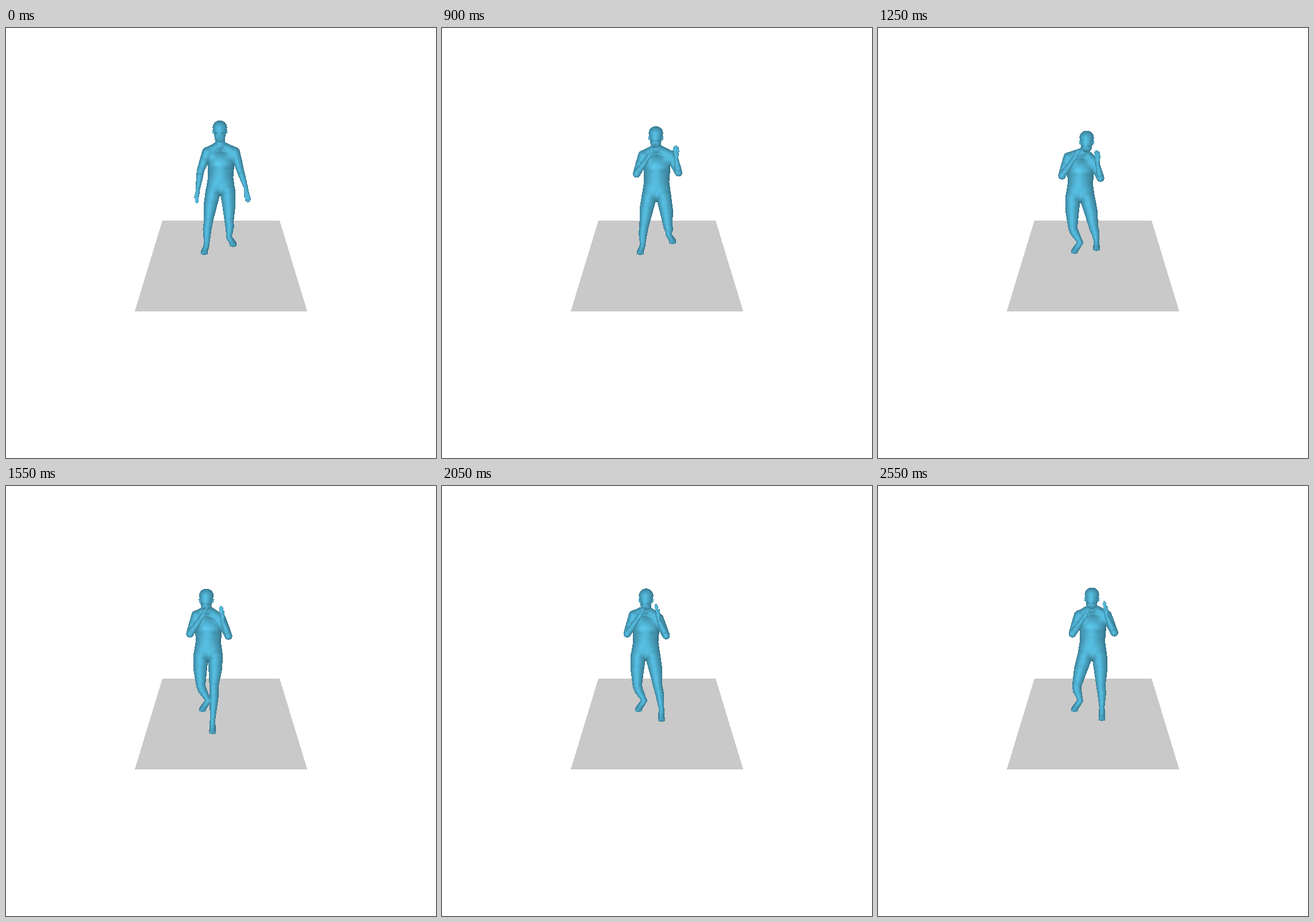
An HTML page with a canvas for the animation above (2600 ms loop, 748 by 748 pixels).

```html
<!DOCTYPE html>
<html lang="en">
<head>
<meta charset="utf-8">
<title>Guard stance</title>
<style>
  html, body { margin: 0; width: 100%; height: 100%; overflow: hidden; background: #fff; }
  svg, canvas { position: absolute; display: block; }
  svg { left: 0; top: 0; }
  canvas { left: 290px; top: 150px; }
</style>
</head>
<body>
<svg width="748" height="748" viewBox="0 0 748 748">
  <path d="M272 335H476L524 493H224Z" fill="#c9c9c9" shape-rendering="crispEdges"/>
</svg>
<canvas id="figure" width="160" height="296"></canvas>
<script>
const LOOP = 2600, STEP = 50;
const OX = 290, OY = 150, W = 160, H = 296;
const BLEND = 1.8;

const clamp = (v, a, b) => Math.min(b, Math.max(a, v));
const mix = (a, b, t) => [a[0] + (b[0] - a[0]) * t, a[1] + (b[1] - a[1]) * t];
const shift = (p, x, y) => [p[0] + x, p[1] + y];
const ramp = (t, a, b) => {
  const u = clamp((t - a) / (b - a), 0, 1);
  return u * u * (3 - 2 * u);
};

// The pose follows from a few eased movements.
// r = the figure's right side (left on screen), l = its left side.
function poseAt(t) {
  const crouch = ramp(t, 400, 1250);
  const bend = ramp(t, 900, 1250);
  const sway = bend - ramp(t, 1900, 2600);
  const nod = ramp(t, 1000, 1600) - ramp(t, 1800, 2500);
  const rGuard = ramp(t, 50, 900), lGuard = ramp(t, 350, 900);
  const turn = ramp(t, 1100, 1850);
  const back = ramp(t, 1600, 2200), lift = 6 * Math.sin(Math.PI * back);

  const hip = [373 - 21.5 * sway, 281 + 12 * ramp(t, 0, 1250)];
  const mid = [hip[0] + 1, 216 + 9 * crouch + 3 * sway];
  const head = [372 - 24 * nod, 161 + 15.5 * crouch + 2 * sway];
  const half = 24 - 3 * sway, tilt = 3 * sway;
  const rSho = shift(mid, -half, -tilt), lSho = shift(mid, half, tilt);

  const rElb = shift(rSho, -11.5, 32), lElb = shift(lSho, 9 + 4.5 * lGuard, 30);
  const rWri = shift(rElb, ...mix([-5, 33], [18, -25], rGuard));
  const lWri = shift(lElb, ...mix([10, 31], [-4 - 9 * turn, -24 - 4 * turn], lGuard));
  const rHand = shift(rWri, ...mix([-2, 24], [11.5, -20], ramp(t, 50, 750)));
  const lHand = shift(lWri, ...mix([5, 26], [-1 - 4 * turn, -23 - 4 * turn], lGuard));

  const rHip = shift(hip, -12.5, 2), lHip = shift(hip, 12.5, 2);
  const rAnk = [349 + 3 * bend, 378 - 5 * bend], rToe = [345 - 3 * bend, 389 - 1.5 * bend];
  const home = mix([395, 375], [401, 370], ramp(t, 0, 900));
  const lunge = mix(mix(home, [380, 382], bend), [358, 428.5], ramp(t, 1250, 1600));
  const lToe = shift(mix(lunge, [389.5, 403], back), -lift, -lift);
  const lAnk = shift(lToe, -7 + 7 * bend, -11 - 6 * ramp(t, 1150, 1500));
  const knee = (h, a, out) => shift(mix(h, a, 53 / (a[1] - h[1])), out, 0);
  const rKnee = knee(rHip, rAnk, -2 - 7 * bend), lKnee = knee(lHip, lAnk, 1 - bend);

  return { hip, mid, head, rSho, lSho, rElb, lElb, rWri, lWri, rHand, lHand, rHip, lHip,
    rKnee, lKnee, rAnk, lAnk, rToe, lToe, crouch, spread: 1.2 - 0.7 * turn };
}

const ctx = document.getElementById('figure').getContext('2d');
const image = ctx.createImageData(W, H);
const sum = new Float64Array(W * H), sumX = new Float64Array(W * H);
const sumY = new Float64Array(W * H), tint = new Float64Array(W * H);

// Tapered capsule; the nearest surface wins, with a soft blend of normals
function limb(a, b, ra, rb, za = 0, zb = za) {
  const dx = b[0] - a[0], dy = b[1] - a[1], len = dx * dx + dy * dy || 1;
  const x0 = Math.max(OX, Math.floor(Math.min(a[0] - ra, b[0] - rb)));
  const x1 = Math.min(OX + W - 1, Math.ceil(Math.max(a[0] + ra, b[0] + rb)));
  const y0 = Math.max(OY, Math.floor(Math.min(a[1] - ra, b[1] - rb)));
  const y1 = Math.min(OY + H - 1, Math.ceil(Math.max(a[1] + ra, b[1] + rb)));
  for (let y = y0; y <= y1; y++) for (let x = x0; x <= x1; x++) {
    const px = x + 0.5 - a[0], py = y + 0.5 - a[1];
    const t = clamp((px * dx + py * dy) / len, 0, 1), r = ra + (rb - ra) * t;
    const ex = px - dx * t, ey = py - dy * t, rest = r * r - ex * ex - ey * ey;
    if (rest <= 0) continue;
    const w = Math.exp((za + (zb - za) * t + Math.sqrt(rest)) / BLEND);
    const k = (y - OY) * W + x - OX;
    sum[k] += w;
    sumX[k] += w * ex / r;
    sumY[k] += w * ey / r;
  }
}

// Soft light or dark spot on the skin
function spot(p, rx, ry, amount) {
  for (let y = Math.floor(p[1] - 2 * ry); y <= p[1] + 2 * ry; y++)
    for (let x = Math.floor(p[0] - 2 * rx); x <= p[0] + 2 * rx; x++) {
      const u = (x + 0.5 - p[0]) / rx, v = (y + 0.5 - p[1]) / ry;
      tint[(y - OY) * W + x - OX] += amount * Math.exp(-u * u - v * v);
    }
}

function hand(wrist, tip, spread) {
  const dx = tip[0] - wrist[0], dy = tip[1] - wrist[1], len = Math.hypot(dx, dy) || 1;
  const at = (t, o) => [wrist[0] + dx * t - dy / len * o, wrist[1] + dy * t + dx / len * o];
  limb(wrist, at(0.45, 0), 3.6, 3.2 + spread * 0.7, 24, 26);
  for (let f = -1.5; f < 2; f++)
    limb(at(0.45, f * 1.3 * spread), at(0.98 - 0.05 * f * f, f * 2.2 * spread), 1.8, 1.2, 27, 28);
  limb(at(0.2, 2), at(0.6, 3 + 1.5 * spread), 1.9, 1.3, 26);
}

function arm(sho, elb, wri, tip, spread) {
  const upper = mix(sho, elb, 0.5), fore = mix(elb, wri, 0.3);
  limb(sho, upper, 9, 8, 1, 5);
  limb(upper, elb, 8, 6.6, 5, 9);
  limb(elb, fore, 6.6, 6, 9, 16);
  limb(fore, wri, 6, 3.8, 16, 23);
  hand(wri, tip, spread);
}

function leg(hip, knee, ank, toe, side, z) {
  const thigh = shift(mix(hip, knee, 0.45), side, 0);
  const calf = shift(mix(knee, ank, 0.33), side, 0);
  limb(hip, thigh, 13.3, 11.8, z, z + 1);
  limb(thigh, knee, 11.8, 8, z + 1, z + 3);
  limb(knee, calf, 8, 7.6, z + 3, z + 1);
  limb(calf, ank, 7.6, 4.6, z + 1, z + 2);
  limb(ank, toe, 4.9, 5.8, z + 2, z + 3);
  for (let i = -2; i <= 2; i++)
    limb(shift(toe, i * 1.6, 1), shift(toe, i * 2.4, 4.6 - Math.abs(i) * 0.6), 1.8, 1.4, z + 5);
  spot(toe, 7, 9, -0.13);
}

function head(top, lean) {
  const [x, y] = top, brow = y + 20 + 5 * lean, fx = x - 1 - lean;
  limb([x, y + 12.6], [x - 0.5 * lean, y + 28.5], 12.6, 9.4, 10, 12);
  for (const s of [-1, 1]) {
    limb([x + s * 11.4, y + 18 + lean], [x + s * 11, y + 22 + lean], 1.9, 1.5, 10);
    spot([fx + s * 4.6, brow + 2], 2.6, 1.6, -0.18);
  }
  limb([fx, brow + 1], [fx, brow + 7], 1.1, 2, 21.5, 22.5);
  spot([fx, brow + 9.6], 3, 1, -0.14);
  spot([fx, brow + 12], 4, 1.1, -0.12);
}

function build(p) {
  const neck = [(p.head[0] + p.mid[0]) / 2, p.mid[1] - 12];
  const chest = shift(p.mid, 0, 18), waist = mix(p.mid, p.hip, 0.66);
  const pelvis = shift(p.hip, 0, -6);

  limb(shift(p.head, 0, 30), neck, 8.5, 9, 2, 0);
  for (const s of [p.rSho, p.lSho]) {
    limb(neck, s, 8.5, 8.4, -1, 1);
    limb(s, chest, 8.5, 18, 0, -5);
  }
  limb(chest, waist, 23.5, 22, -8);
  limb(waist, pelvis, 22, 18.5, -8, -6);
  limb(shift(waist, -4, 0), p.rHip, 18, 13.3, -6, 0);
  limb(shift(waist, 4, 0), p.lHip, 18, 13.3, -6, 0);

  leg(p.rHip, p.rKnee, p.rAnk, p.rToe, -1, 0);
  leg(p.lHip, p.lKnee, p.lAnk, p.lToe, 1, 3);
  head(p.head, p.crouch);
  arm(p.rSho, p.rElb, p.rWri, p.rHand, 0.6);
  arm(p.lSho, p.lElb, p.lWri, p.lHand, p.spread);

  for (const s of [-1, 1]) {
    spot(shift(p.mid, s * 9, 20), 7, 4, 0.07);
    spot(shift(p.mid, s * 9, 28), 7, 3, -0.06);
    spot(shift(p.hip, s * 8, 6), 5, 3, -0.05);
  }
  spot(shift(neck, 0, 4), 8, 3, -0.08);
  spot(shift(p.hip, 0, 9), 4, 4, -0.1);
}

function paint() {
  const px = image.data;
  for (let k = 0; k < W * H; k++) {
    const w = sum[k], o = 4 * k;
    px[o + 3] = w ? 255 : 0;
    if (!w) continue;
    const nx = sumX[k] / w, ny = sumY[k] / w;
    const nz = Math.sqrt(Math.max(0, 1 - nx * nx - ny * ny));
    const lit = clamp((nz - 0.14 * nx + 0.05 * ny) / 1.012, 0, 1);
    const v = 0.56 + 0.32 * lit + 0.13 * lit ** 10 + tint[k];
    px[o] = 86 * v;
    px[o + 1] = 189 * v;
    px[o + 2] = 224 * v;
  }
  ctx.putImageData(image, 0, 0);
}

let shown = -1;
function draw(now) {
  const time = Math.floor((now % LOOP) / STEP) * STEP;
  if (time === shown) return;
  shown = time;
  for (const buf of [sum, sumX, sumY, tint]) buf.fill(0);
  build(poseAt(time));
  paint();
}

let start = null;
function tick(now) {
  if (start === null) start = now;
  draw(Math.max(0, now - start));
  requestAnimationFrame(tick);
}
draw(0);
requestAnimationFrame(tick);
</script>
</body>
</html>
```
